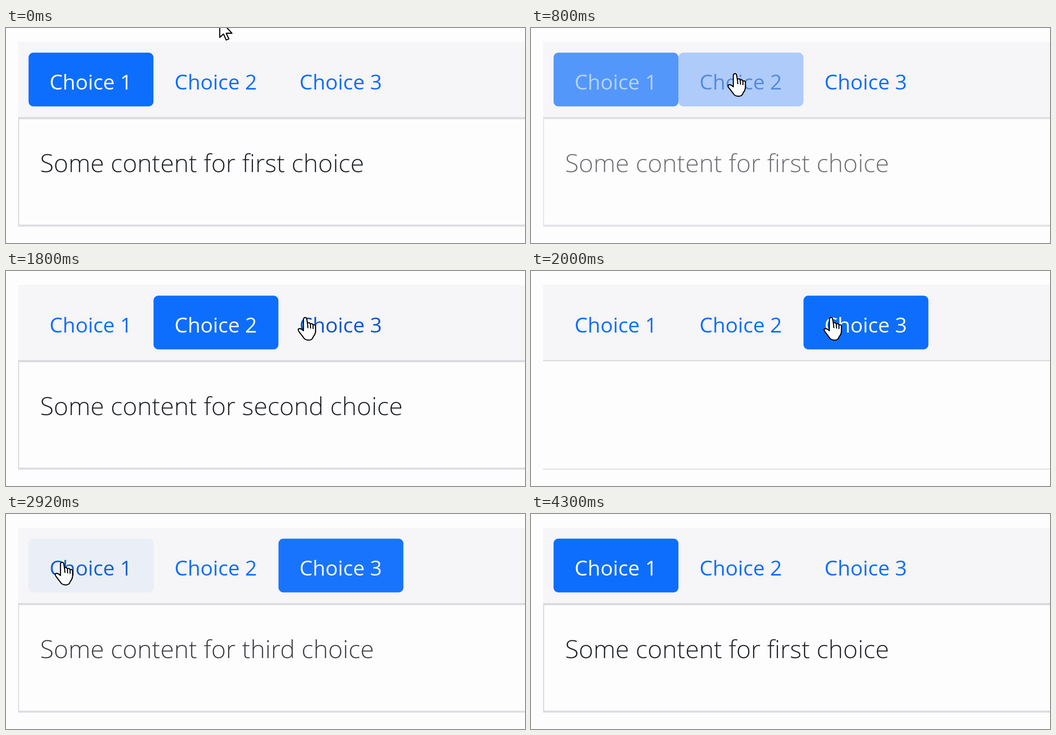
An HTML page that plays this animation: 1162x482 px, repeating every 4.42 s.

```html
<!DOCTYPE html>
<html lang="en">
<head>
<meta charset="utf-8">
<title>Tabs</title>
<style>
  html, body { margin: 0; width: 100%; height: 100%; overflow: hidden; background: #fefdfe; }
  svg { display: block; width: 100%; height: 100%; }
  text { font-family: "Open Sans", "Noto Sans", sans-serif; white-space: pre; }
  .tab { font-size: 46.5px; }
  .lead { font-size: 56px; font-weight: 300; fill: #212529; }
  .cursor { fill: #fff; stroke: #000; stroke-width: 2.4; stroke-linejoin: round; stroke-linecap: round; }
</style>
</head>
<body>
<svg viewBox="0 0 1162 482">
  <rect width="1162" height="482" fill="#fefdfe"/>
  <rect x="27" y="31" width="1135" height="169" fill="#f6f5f7"/>
  <rect x="27" y="199.7" width="1135" height="2.6" fill="#dadadd"/>
  <rect x="27" y="443" width="1135" height="2.4" fill="#dfdfe3"/>
  <g id="pane">
    <path d="M1162 203.3H28.2V442H1162" fill="none" stroke="#d9dadf" stroke-width="2.4"/>
    <text id="lead" class="lead" x="76.3" y="322.5"></text>
  </g>
  <g id="tabs"></g>
  <path id="arrow" class="cursor" d="M0 0V39L8.5 31.5L14.5 45L20.5 42.5L14.5 29.8H27.5Z"/>
  <g id="hand" class="cursor">
    <path d="M-3 3Q0 -2 4 2L6 13Q10 10 12.5 15Q16 12 18.5 17Q23 15 24 20V32Q23 39 19 43Q17 51 9 51Q0 51 -3 45L-13 32Q-17 26 -12 25Q-8 25 -3 30Z"/>
    <path d="M6 13L7 23M12.5 15L13 24M18.5 17L18.5 25" fill="none"/>
  </g>
</svg>
<script>
const LOOP = 4420, FADE = 150, PANE_GAP = 10;
const LINK = [13, 110, 253], HOVER = [10, 88, 202], WHITE = [255, 255, 255];
const NAMES = ["first", "second", "third"];

// Clicks: time and tab index
const clicks = [[-LOOP, 0], [746, 1], [1845, 2], [2900, 0]];
// Hover spans: tab index, start, end
const hovers = [[1, 260, 1560], [2, 1560, 2185], [1, 2185, 2330], [0, 2330, 3050]];
// Pointer keys: time, x, y
const path = [
  [0, 478.5, -18], [580, 456, 101], [800, 456, 102], [1210, 498, 102], [1320, 502, 102],
  [1800, 669, 104], [2000, 671, 104], [2060, 671, 104], [2520, 125, 108],
  [2960, 125, 108], [3190, 112, -50]
];

const $ = id => document.getElementById(id);
const clamp = v => Math.min(1, Math.max(0, v));
const smooth = u => u * u * (3 - 2 * u);
const ramp = (t, start) => clamp((t - start) / FADE);
const lerp = (a, b, u) => a + (b - a) * u;
const mix = (a, b, u) => a.map((v, i) => lerp(v, b[i], u));
const rgb = c => `rgb(${c.map(Math.round)})`;

function make(tag, attrs) {
  const el = document.createElementNS("http://www.w3.org/2000/svg", tag);
  for (const k in attrs) el.setAttribute(k, attrs[k]);
  return $("tabs").appendChild(el);
}

const tabs = NAMES.map((_, i) => {
  const x = 50.5 + i * 279.8;
  const box = make("rect", { x, y: 55.3, width: 279.6, height: 120.4, rx: 11, fill: rgb(LINK) });
  const label = make("text", { class: "tab", x: x + 47, y: 138 });
  label.textContent = "Choice " + (i + 1);
  return { box, label };
});

function clickAt(t) {
  let k = 0;
  while (k + 1 < clicks.length && clicks[k + 1][0] <= t) k++;
  return k;
}

function drawTabs(t, k) {
  const [start, on] = clicks[k];
  const off = k ? clicks[k - 1][1] : -1;
  const u = smooth(ramp(t, start));
  tabs.forEach(({ box, label }, i) => {
    const active = i === on ? u : i === off ? 1 - u : 0;
    const hover = Math.max(0, ...hovers.map(([tab, a, b]) =>
      tab === i ? smooth(ramp(t, a)) * (1 - smooth(ramp(t, b))) : 0));
    box.setAttribute("opacity", active);
    label.setAttribute("fill", rgb(mix(mix(LINK, HOVER, hover), WHITE, active)));
  });
}

function drawPane(t, k) {
  const [start, on] = clicks[k];
  const next = start + FADE + PANE_GAP;
  const leaving = t < next;
  $("lead").textContent = `Some content for ${NAMES[leaving ? clicks[k - 1][1] : on]} choice`;
  $("pane").setAttribute("opacity", leaving ? 1 - ramp(t, start) : ramp(t, next));
}

function drawPointer(t) {
  let i = 0;
  while (i < path.length - 2 && path[i + 1][0] <= t) i++;
  const [ta, xa, ya] = path[i], [tb, xb, yb] = path[i + 1];
  const u = smooth(clamp((t - ta) / (tb - ta)));
  const x = lerp(xa, xb, u), y = lerp(ya, yb, u);
  const over = y >= 55;
  for (const [id, shown] of [["hand", over], ["arrow", !over]]) {
    $(id).setAttribute("transform", `translate(${x} ${y})`);
    $(id).setAttribute("visibility", shown ? "visible" : "hidden");
  }
}

function draw(t) {
  const k = clickAt(t);
  drawTabs(t, k);
  drawPane(t, k);
  drawPointer(t);
}

const began = performance.now();
function tick() {
  draw((performance.now() - began) % LOOP);
  requestAnimationFrame(tick);
}
tick();
</script>
</body>
</html>
```
